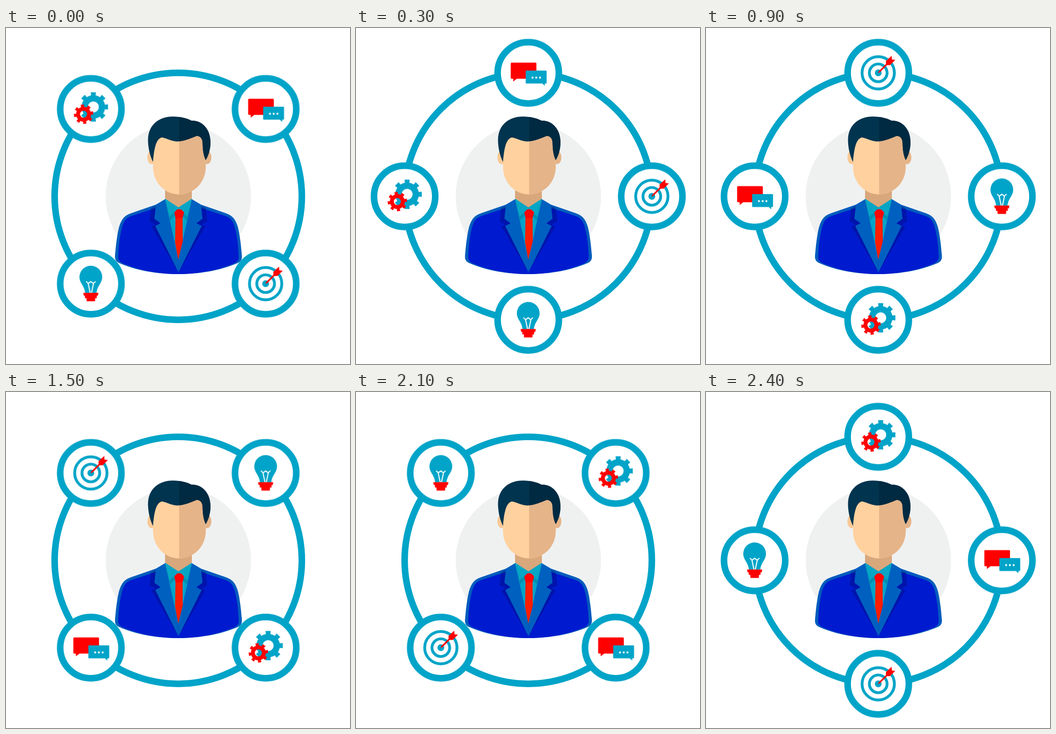
An HTML page that plays this animation: 757x740 px, repeating every 2700 ms.

```html
<!DOCTYPE html>
<html lang="en">
<head>
<meta charset="utf-8">
<title>Business skills cycle</title>
<style>
  html, body { margin: 0; width: 100%; height: 100%; overflow: hidden; background: #fff; }
  svg { display: block; width: 757px; height: 740px; }
  .blue { fill: #00a4c8; }
  .red { fill: #f00; }
  .ring { fill: none; stroke: #00a4c8; stroke-width: 14.5; }
  .disc { fill: #fff; }
  .line { fill: none; stroke: #fff; stroke-width: 2.3; }
</style>
</head>
<body>
<svg viewBox="0 0 757 740">
  <defs>
    <clipPath id="right"><path d="M381 180H470V380H381Z"/></clipPath>
    <path id="face" d="M323.5 240V306C323.5 341 350 366.500 381 366.500S439.500 341 439.500 306V236L381 225Z"/>
    <path id="hair" d="M323.500 295C316 280 312.500 262 312.500 246C313 212 338 195 367 195C384 195 399 199 408 204C432 203 450 223 450 252C450 268 445 282 439.500 291C434 279 433 268 432.500 252C432 243 427 238 420 237.500C406 243 394 249 376 250C362 249 352 242 343 241C331 244 326 262 323.500 295Z"/>
    <g id="lapel">
      <path d="M331 391L319 397L316 426L329 433L320 437L379.500 538Z" fill="#000050" opacity=".28"/>
      <path d="M350 377L330 389L326.500 420L340 430L328.500 436L379.500 538V377Z" fill="#0060c0"/>
    </g>
    <g id="collar">
      <path d="M351 381L361 424L381 402Z" fill="#008fae"/>
      <path d="M350 376L381 396L360 415Z" fill="#06a5c5"/>
    </g>
  </defs>

  <circle cx="379.300" cy="370.500" r="160" fill="#eff1f1"/>
  <circle class="ring" cx="379" cy="370.700" r="272"/>

  <!-- torso -->
  <path fill="#005cbd" d="M350 378L330 389L275 408C257 414 251 427 247 446C243 466 241.500 484 240 500C239 511 243 515 250 518C285 533 330 542 379.500 542S474 533 509 518C516 515 520 511 519 500C517.500 484 516 466 512 446C508 427 502 414 484 408L429 389L409 378Z"/>
  <path fill="#001bcf" d="M331 396L276 414C261 419 257 430 253 449C249 468 248 484 247 500C246 510 249 514 256 518C290 533 335 542 379.500 542S469 533 503 518C510 514 513 510 512 500C511 484 510 468 506 449C502 430 498 419 483 414L428 396Z"/>
  <use href="#lapel"/>
  <use href="#lapel" transform="matrix(-1 0 0 1 759 0)"/>

  <!-- neck, shirt and tie -->
  <path class="blue" d="M350 377L379.500 510L409 377Z"/>
  <path fill="#d9a77c" d="M350 350H409V377L381 397L350 376Z"/>
  <use href="#collar"/>
  <use href="#collar" transform="matrix(-1 0 0 1 759 0)"/>
  <path fill="#ff1c00" d="M373 416L372 472L379 510L389 470L388.500 416Z"/>
  <path fill="#ff0500" d="M370.500 406L376 400Q381 398 386 400L392 406L388.500 419H373Z"/>

  <!-- head -->
  <ellipse cx="320.500" cy="285" rx="9.500" ry="15" fill="#fac996"/>
  <ellipse cx="442.500" cy="285" rx="9.500" ry="15" fill="#e5b489"/>
  <use href="#face" fill="#ffd19f"/>
  <use href="#face" fill="#e5b489" clip-path="url(#right)"/>
  <use href="#hair" fill="#00344f"/>
  <use href="#hair" fill="#002a41" clip-path="url(#right)"/>

  <!-- orbiting badges, in order of starting angle -->
  <g class="badge">
    <path class="red" d="M-36.500 -22.500H16Q18 -22.500 18 -20.500V11Q18 13 16 13H-25L-33 19V13H-36.500Q-38.500 13 -38.500 11V-20.500Q-38.500 -22.500 -36.500 -22.500Z"/>
    <path class="blue" d="M-4 -5H39Q40.500 -5 40.500 -3.500V22Q40.500 23.500 39 23.500H36.500V28.500L31 23.500H-4Q-5.500 23.500 -5.500 22V-3.500Q-5.500 -5 -4 -5Z"/>
    <path d="M9.500 10.500h0M17.700 10.500h0M26 10.500h0" stroke="#fff" stroke-width="4.400" stroke-linecap="round"/>
  </g>
  <g class="badge">
    <g fill="none" stroke="#00a4c8" stroke-width="6.200">
      <circle r="35.600"/>
      <circle r="19.500"/>
    </g>
    <circle class="blue" r="7.500"/>
    <path class="red" d="M-.5 .5L1 -3.500L17 -19.500V-26L29.500 -37.500L30 -29.500L37.500 -28.500L26 -17H19.500L3.500 -1Z"/>
  </g>
  <g class="badge">
    <path class="blue" d="M-25 -14.500A25 25 0 0 1 25 -14.500C25 -1 14 4 12.500 20.500H-12.500C-14 4 -25 -1 -25 -14.500Z"/>
    <path class="line" d="M-10.500 -5L-5.500 -.5L0 -4.500L5.500 -.5L10.500 -5M-6 -1L-1.500 20M6 -1L1.500 20"/>
    <path class="red" d="M-15.500 20.300H15.500Q17 20.300 16.500 22L15.500 26.500H13V32H9.500V37Q9.500 38.800 8 38.800H-8Q-9.500 38.800 -9.500 37V32H-13V26.500H-15.500L-16.500 22Q-17 20.300 -15.500 20.300Z"/>
  </g>
  <g class="badge">
    <path id="bigGear" class="blue" fill-rule="evenodd" transform="translate(5.500 -4.500)"/>
    <path id="smallGear" class="red" fill-rule="evenodd" transform="translate(-16 11.500)"/>
  </g>
</svg>
<script>
  const LOOP = 2700;
  const STARTS = [0, 300, 600, 900, 1500, 1800, 2100, 2400];
  const CENTER = { x: 379, y: 370.7 };
  const ORBIT = 272;
  const NS = 'http://www.w3.org/2000/svg';

  const polar = (r, deg) => {
    const a = deg * Math.PI / 180;
    return `${(r * Math.cos(a)).toFixed(2)} ${(r * Math.sin(a)).toFixed(2)}`;
  };

  // Eight-toothed wheel with a round hole; skip leaves out one hidden tooth.
  function gear(id, { tip, body, hole, turn, skip }) {
    let d = '';
    for (let i = 0; i < 8; i++) {
      const a = turn + i * 45;
      const tooth = i === skip ? [] : [[tip, -10], [tip, 10]];
      const points = [[body, -11], ...tooth, [body, 11]];
      points.forEach(([r, off], j) => {
        const cmd = !d ? 'M' : j ? 'L' : `A${body} ${body} 0 0 1 `;
        d += cmd + polar(r, a + off);
      });
    }
    d += `A${body} ${body} 0 0 1 ${polar(body, turn - 11)}Z`;
    d += `M${hole} 0A${hole} ${hole} 0 1 0 ${-hole} 0A${hole} ${hole} 0 1 0 ${hole} 0Z`;
    document.getElementById(id).setAttribute('d', d);
  }

  gear('bigGear', { tip: 32.7, body: 26, hole: 12, turn: 0, skip: 4 });
  gear('smallGear', { tip: 21.5, body: 16.5, hole: 7.8, turn: -8 });

  function addCircle(parent, r, name) {
    const c = document.createElementNS(NS, 'circle');
    c.setAttribute('r', r);
    c.setAttribute('class', name);
    parent.prepend(c);
  }

  // Each badge jumps an eighth of a turn anticlockwise and stays upright.
  document.querySelectorAll('.badge').forEach((badge, i) => {
    addCircle(badge, 67.4, 'ring');
    addCircle(badge, 67.4, 'disc');
    const pose = step => {
      const a = (i * 90 - 45 - step * 45) * Math.PI / 180;
      const x = CENTER.x + ORBIT * Math.cos(a);
      const y = CENTER.y + ORBIT * Math.sin(a);
      return `translate(${x.toFixed(2)}px, ${y.toFixed(2)}px)`;
    };
    const frames = STARTS.map((t, step) => ({
      offset: t / LOOP, transform: pose(step), easing: 'step-end'
    }));
    frames.push({ offset: 1, transform: pose(8) });
    badge.animate(frames, { duration: LOOP, iterations: Infinity }).startTime = 0;
  });
</script>
</body>
</html>
```
